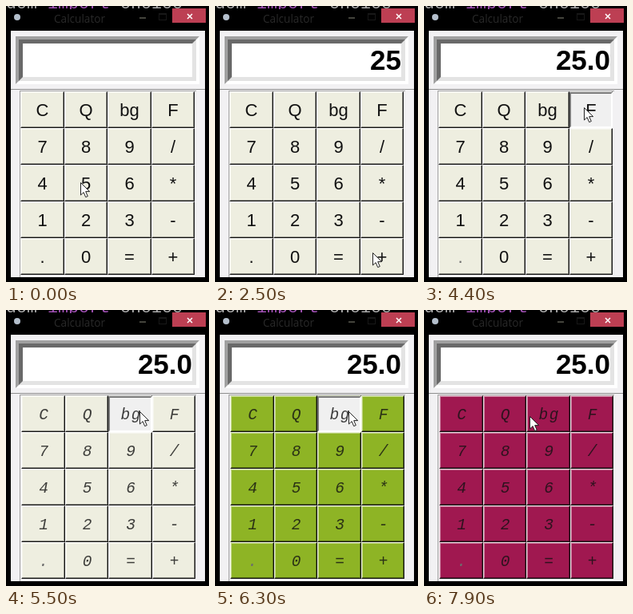
These frames come from a looping animation (254 by 346 pixels, 8000 ms). An HTML page:

```html
<!DOCTYPE html>
<html lang="en">
<head>
<meta charset="utf-8">
<title>Calculator</title>
<style>
  html, body { margin: 0; width: 100%; height: 100%; overflow: hidden; background: #000; }
  .stage { position: relative; width: 254px; height: 346px; overflow: hidden; background: #000; }
  .stage > * { position: absolute; }

  /* One shared clock: 8 s loop on a 100 ms grid */
  .pad, .key, .key::before, .op, .dot, .screen span, .cursor {
    animation: 8s step-end -5ms infinite;
  }

  /* Editor line behind the window and title bar */
  .code { left: -26px; top: -15px; font: 21.66px/25px "Liberation Mono", monospace; color: #a9a9a9; white-space: pre; }
  .code em { font-style: normal; color: #a050b4; }
  .bar { left: 0; top: 4px; width: 254px; height: 27px; background: #000; }
  .icon { left: 10px; top: 10px; width: 8px; height: 8px; border-radius: 50%; background: #b4bfcc; }
  .title { left: 60px; top: 6px; font: 13.6px/20px "Open Sans", sans-serif; color: #292929; }
  .min { left: 167px; top: 14px; width: 8px; height: 2px; background: #44443c; }
  .max { left: 191px; top: 9px; width: 8px; height: 6px; border: 1px solid #181818; border-top-width: 2px; }
  .close { left: 208px; top: 3px; width: 42px; height: 18px; background: #bd3f53; }
  .close svg { position: absolute; left: 18px; top: 6px; }

  /* Window panels */
  .win { left: 6px; top: 31px; width: 243px; height: 309px; background: #f2f1f3; }
  .line { left: 6px; top: 104px; width: 243px; height: 1px; background: #8e8e8e; }
  .frame { left: 17px; top: 106px; width: 220px; height: 233px; border: 1px solid #a0a0a0; border-width: 1px 0 0 1px; }

  .screen {
    left: 12px; top: 38px; width: 222px; height: 52px; background: #fff;
    border: 4px solid; border-color: #a0a0a0 #fff #fff #a0a0a0;
  }
  .screen::before {
    content: ""; position: absolute; inset: 0; border: 5px solid;
    border-color: #696969 #e3e3e3 #e3e3e3 #696969;
  }
  .screen span {
    position: absolute; right: 5px; top: 6px; opacity: 0;
    font: bold 35px/40px "Liberation Sans", Arial, sans-serif; color: #000;
  }
  .screen .s1 { animation-name: s1; }
  .screen .s2 { animation-name: s2; }
  .screen .s3 { animation-name: s3; }
  .screen .s4 { animation-name: s4; }
  @keyframes s1 { 0%, 12.5%, 100% { opacity: 0 } 7.5% { opacity: 1 } }
  @keyframes s2 { 0%, 31.25%, 100% { opacity: 0 } 25% { opacity: 1 } }
  @keyframes s3 { 0%, 42.5%, 100% { opacity: 0 } 31.25% { opacity: 1 } }
  @keyframes s4 { 0% { opacity: 0 } 42.5%, 100% { opacity: 1 } }

  /* Keys; the new font nudges the whole pad */
  .pad {
    left: 18px; top: 107px; display: grid;
    grid: repeat(5, 46px) / 55px 54px 55px 54px;
    animation-name: nudge;
  }
  @keyframes nudge { 0% { left: 18px } 57.5%, 100% { left: 19px } }
  .key {
    position: relative; isolation: isolate; box-sizing: border-box; text-align: center;
    white-space: nowrap; color: #111;
    border: 1px solid; border-color: #ffffffd0 #111 #111 #ffffffd0;
    box-shadow: inset -1px -1px #0006, inset 1px 1px #fff6;
    animation-name: face, type;
  }
  .key::before {
    content: ""; position: absolute; z-index: -1; inset: 0 -1px -1px; opacity: 0; background: #f0f0f0;
    border: 2px solid; border-color: #777 #fff #fff #777;
  }
  @keyframes face {
    0% { background-color: #eeeee0 }
    71.25% { background-color: #8eb425 }
    82.5% { background-color: #7f7f7f }
    90%, 100% { background-color: #a01850 }
  }
  @keyframes type {
    0% {
      font: 22px/45px "Liberation Sans", Arial, sans-serif;
      letter-spacing: 0; text-indent: 0; opacity: 1;
    }
    57.5%, 100% {
      font: italic 19.5px/48px "Liberation Mono", "Courier New", monospace;
      letter-spacing: 1.5px; text-indent: 2.5px; color: #111c;
    }
  }

  /* Operators and the point grey out while unavailable */
  .op { animation-name: op; }
  .dot { animation-name: dot; }
  @keyframes op { 0%, 25% { color: #111 } 12.5% { color: #6d6d6d } 57.5%, 100% { color: #111c } }
  @keyframes dot { 0% { color: #111 } 42.5%, 100% { color: #6d6d6d } }

  /* Presses */
  .c::before { animation-name: press-c; }
  .f::before { animation-name: press-f; }
  .bg::before { animation-name: press-bg; }
  .two::before { animation-name: press-two; }
  .five::before { animation-name: press-five; }
  .eq::before { animation-name: press-eq; }
  @keyframes press-c { 0%, 12.5%, 100% { opacity: 0 } 11.25% { opacity: 1 } }
  @keyframes press-f { 0%, 57.5%, 100% { opacity: 0 } 55% { opacity: 1 } }
  @keyframes press-bg {
    0%, 71.25%, 82.5%, 90%, 100% { opacity: 0 }
    68.75%, 76.25%, 85% { opacity: 1 }
  }
  @keyframes press-two { 0%, 25%, 100% { opacity: 0 } 23.75% { opacity: 1 } }
  @keyframes press-five { 0%, 7.5%, 31.25%, 100% { opacity: 0 } 1.25%, 30% { opacity: 1 } }
  @keyframes press-eq { 0%, 42.5%, 100% { opacity: 0 } 38.75% { opacity: 1 } }

  .cursor { left: 0; top: 1px; animation-name: move; }
  @keyframes move {
    0% { transform: translate(93px, 220px) }
    1.25% { transform: translate(104px, 239px) }
    7.5% { transform: translate(104px, 239px); animation-timing-function: steps(4, start) }
    12.5% { transform: translate(48px, 131px); animation-timing-function: steps(3, start) }
    16.25% { transform: translate(84px, 164px) }
    18.75% { transform: translate(84px, 164px); animation-timing-function: steps(3, start) }
    22.5% { transform: translate(110px, 221px); animation-timing-function: steps(2, start) }
    25% { transform: translate(107px, 264px) }
    30% { transform: translate(109px, 224px) }
    31.25% { transform: translate(197px, 308px) }
    33.75% { transform: translate(197px, 308px); animation-timing-function: steps(2, start) }
    36.25% { transform: translate(172px, 305px) }
    38.75% { transform: translate(165px, 310px) }
    47.5% { transform: translate(165px, 310px); animation-timing-function: steps(5, start) }
    53.75% { transform: translate(200px, 126px) }
    62.5% { transform: translate(200px, 126px); animation-timing-function: steps(4, start) }
    67.5% { transform: translate(167px, 126px) }
    93.75% { transform: translate(167px, 126px); animation-timing-function: steps(5, start) }
    100% { transform: translate(132px, 132px) }
  }
</style>
</head>
<body>
<div class="stage">
  <div class="code">andom <em>import</em> choice</div>
  <div class="bar"></div>
  <div class="icon"></div>
  <div class="title">Calculator</div>
  <div class="min"></div>
  <div class="max"></div>
  <div class="close">
    <svg width="8" height="8"><path d="M1 1 7 7M7 1 1 7" stroke="#fff" stroke-width="1.5"/></svg>
  </div>
  <div class="win"></div>
  <div class="line"></div>
  <div class="frame"></div>
  <div class="screen">
    <span class="s1">5</span><span class="s2">2</span><span class="s3">25</span><span class="s4">25.0</span>
  </div>
  <div class="pad">
    <div class="key c">C</div><div class="key">Q</div><div class="key bg">bg</div><div class="key f">F</div>
    <div class="key">7</div><div class="key">8</div><div class="key">9</div><div class="key"><span class="op">/</span></div>
    <div class="key">4</div><div class="key five">5</div><div class="key">6</div><div class="key"><span class="op">*</span></div>
    <div class="key">1</div><div class="key two">2</div><div class="key">3</div><div class="key"><span class="op">-</span></div>
    <div class="key"><span class="dot">.</span></div><div class="key">0</div><div class="key eq">=</div><div class="key"><span class="op">+</span></div>
  </div>
  <svg class="cursor" width="14" height="21">
    <path d="M.5 .5V16l3.6-3.4 2.6 6 2.6-1.1-2.6-5.9h5z" fill="#fff" stroke="#222"/>
  </svg>
</div>
</body>
</html>
```
